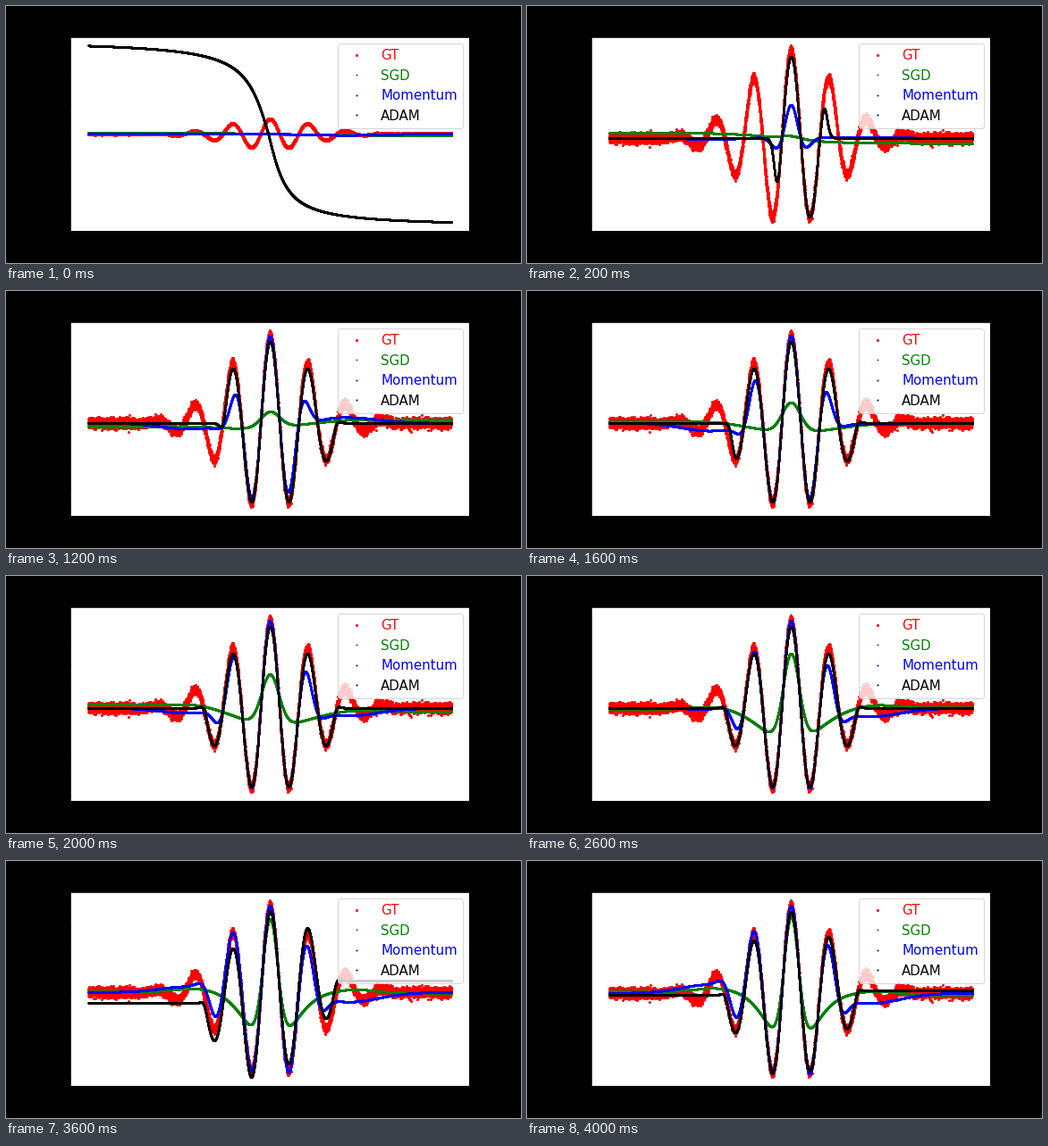
A matplotlib script that plays this animation: 576 by 288 pixels, repeating every 4.2 s.

```python
import numpy as np
import matplotlib.pyplot as plt
from matplotlib.animation import FuncAnimation

FRAMES, INTERVAL = 21, 200
COUNT = 10000
PX = 67.63   # stage pixels per unit of x

rng = np.random.default_rng(4)
x = np.linspace(-3, 3, COUNT)
d = x * PX   # distance from the centre in pixels
wave = np.exp(-x ** 2) * np.cos(10 * x)
truth = wave + rng.normal(0, 0.026, COUNT)


def sigmoid(v):
    return 1 / (1 + np.exp(-np.clip(v, -60, 60)))


def bell(centre, width):
    return np.exp(-((d - centre) / width) ** 2)


def window(left, right, softness):
    """1 between -left and right, falling to 0 outside."""
    return sigmoid((d + left) / softness) * sigmoid((right - d) / softness)


def sgd(step):
    """One slowly sharpening central peak with a dip on each side."""
    grown = sigmoid((step - 10.8) / 2.7)
    peak = 0.9 * grown
    dip = peak * (0.35 + 0.4 * grown)
    tilt = -0.08 * np.exp(-step / 14) * np.cos(np.pi * step / 5)
    return ((peak + dip) * bell(0, 15.5 - 4 * grown)
            - dip * bell(0, 70 - 36 * grown)
            + 0.04 * grown * (bell(-85, 30) + bell(95, 30))
            + tilt * np.tanh(d / 60))


def momentum(step):
    """The wave seen through a widening soft window, with slow tails."""
    left = 80 * (1 - np.exp(-step / 8.5))
    right = 58 * (1 - np.exp(-step / 6.5))
    left_tail = np.interp(step, [0, 8, 20], [0, -0.09, 0.1])
    right_tail = np.interp(step, [0, 3, 10, 20], [-0.08, 0.18, -0.09, -0.12])
    gain = 1 - np.exp(-step)
    return (gain * wave * window(left, right, 7)
            + left_tail * bell(-90, 45) + right_tail * bell(85, 50))


def adam(step):
    """Starts as a huge step, then learns the wave one half period at a time."""
    if step == 0:
        offset = d + 2
        k = np.where(offset < 0, 0.05, 0.062)
        return -5.9 * np.arctan(k * offset) / np.arctan(k * 203)
    seen = window(min(11 + 7 * step, 74), min(32 + 7 * step, 74), 2)
    kick = 0.13 * np.exp(-(step - 18) / 1.2) if step >= 18 else 0
    return seen * (0.96 * wave - 0.03) + kick * np.tanh(d / 30)


fig, ax = plt.subplots(figsize=(8, 4), dpi=72, facecolor="black")
fig.subplots_adjust(left=0.125, right=0.9, bottom=0.125, top=0.88)
ax.set_xlim(-3.3, 3.3)

colors = ["red", "green", "blue", "black"]
names = ["GT", "SGD", "Momentum", "ADAM"]
dots = [ax.plot(x, truth, ".", markersize=size, color=color, label=name)[0]
        for size, color, name in zip([4, 2, 2, 2], colors, names)]
ax.legend(loc="upper right", fontsize=15, labelcolor=colors)


def update(step):
    curves = [truth, sgd(step), momentum(step), adam(step)]
    for dot, y in zip(dots, curves):
        dot.set_ydata(y)
    low, high = np.min(curves), np.max(curves)
    pad = 0.05 * (high - low)
    ax.set_ylim(low - pad, high + pad)
    return dots


anim = FuncAnimation(fig, update, frames=FRAMES, interval=INTERVAL, repeat=True, repeat_delay=0)
plt.show()
```
